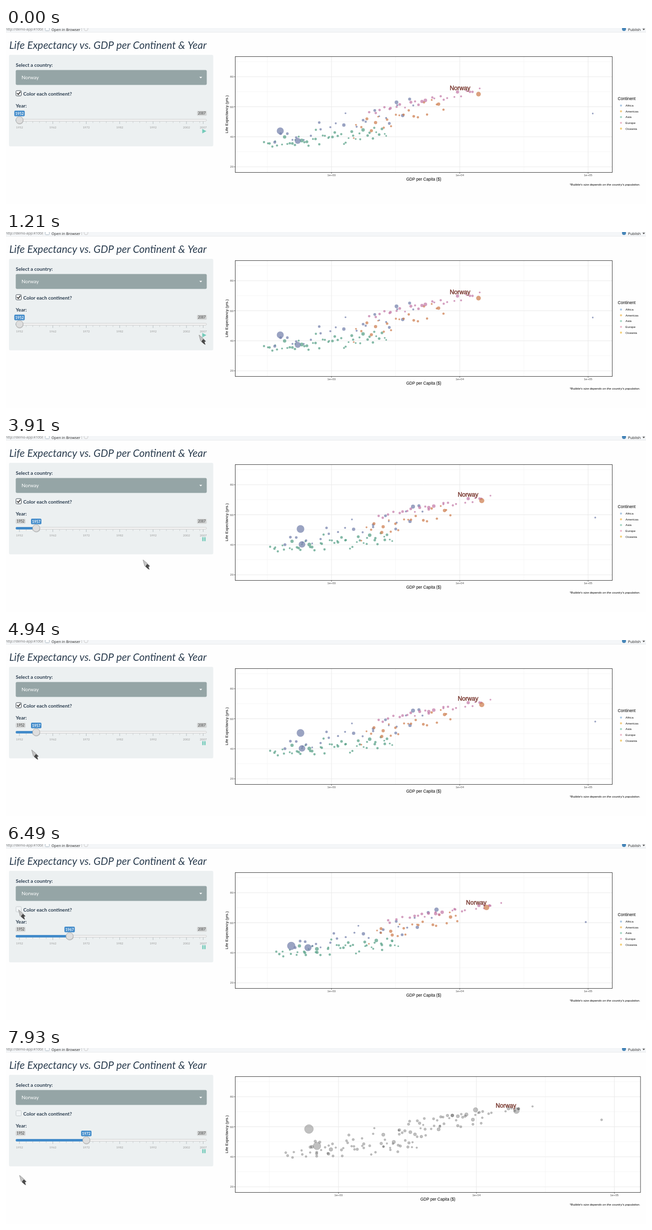
Animation of 1280x354 px, one loop 7.99 s. Source, as an HTML page with a canvas:

```html
<!DOCTYPE html>
<html lang="en">
<head>
<meta charset="utf-8">
<title>Life expectancy dashboard</title>
<style>
html, body { margin: 0; width: 100%; height: 100%; overflow: hidden; background: #fefefe; }
canvas { display: block; }
</style>
</head>
<body>
<canvas width="1280" height="354"></canvas>
<script>
const ctx = document.querySelector('canvas').getContext('2d');
const LOOP = 7990;
const LATO = 'Lato, sans-serif';
const ARIAL = '"Liberation Sans", Arial, sans-serif';
const INK = '#2c3e50', BLUE = '#428bca', BROWN = '#7c3d34';

const SLIDER_STEPS = [3450, 4950, 6490, 7930];
const PLOT_STEPS = [3910, 5320, 6880];
const PLAY_CLICK = 1840, UNCHECK = 6340;
const FADE_START = 6880, MONO = 7110, FADE_END = 7180;

// Pointer moves: start, end, x, y reached
const POINTER_START = [1080, 329];
const MOVES = [
  [70, 620, 264, 245], [620, 820, 342, 211], [900, 1210, 386, 207], [1620, 1680, 397, 206],
  [2080, 2390, 274, 249], [4310, 5010, 27, 218], [5730, 6340, 25, 132],
  [6490, 6650, 24, 179], [6880, 7030, 27, 249], [7110, 7180, 27, 256]
];

const COLORS = {
  africa: 'rgba(86,160,134,.72)', asia: 'rgba(115,128,170,.72)',
  americas: 'rgba(205,125,77,.72)', europe: 'rgba(196,122,167,.72)'
};

// Each continent is a seeded cloud along a line; every step shifts it right and
// shrinks its distance to CEILING by the factor rest.
const CEILING = 112;
const CLOUDS = [
  { continent: 'africa', count: 48, from: [516, 234], to: [765, 207], spread: 19, shift: 13, rest: .94 },
  { continent: 'asia', count: 24, from: [530, 230], to: [825, 158], spread: 27, shift: 17, rest: .92 },
  { continent: 'americas', count: 22, from: [690, 204], to: [880, 150], spread: 23, shift: 17, rest: .89 },
  { continent: 'europe', count: 26, from: [725, 168], to: [950, 126], spread: 8, shift: 19, rest: .85 }
];

// Leading bubbles, with their place in each of the four years
const LEADERS = [
  { continent: 'asia', r: 7, path: [[548.5, 207], [589, 187], [570.5, 205], [596, 163]] },
  { continent: 'asia', r: 6, path: [[583.5, 227], [592, 218], [604, 208.5], [611, 197]] },
  { continent: 'asia', r: 3.7, path: [[781, 149.5], [814, 142], [861, 132], [906, 124.5]] },
  { continent: 'asia', r: 1.7, path: [[1173.5, 172], [1178.5, 164], [1159.5, 157], [1140.5, 144.5]] },
  { continent: 'americas', r: 4.7, path: [[945, 133], [951.5, 130], [961, 127.5], [982, 126]] }
];
const LABEL_PATH = [[908, 125], [924, 122], [940.5, 122], [962.5, 120]];

let seed = 11;
const random = () => (seed = seed * 16807 % 2147483647) / 2147483647;
const mix = (a, b, k) => a + (b - a) * k;
const countPassed = (times, t) => times.filter(time => t >= time).length;

const bubbles = CLOUDS.flatMap(({ count, from, to, spread, ...cloud }) =>
  Array.from({ length: count }, (_, i) => {
    const along = (i + random()) / count;
    return {
      ...cloud,
      x: mix(from[0], to[0], along),
      y: mix(from[1], to[1], along) + spread * (random() + random() - 1),
      r: 1.7 + .9 * random() + 1.2 * random() ** 6,
      pace: .7 + .6 * random()
    };
  }));

function text(string, x, y, font, color, align = 'left') {
  ctx.font = font;
  ctx.fillStyle = color;
  ctx.textAlign = align;
  ctx.fillText(string, x, y);
}
function paint(fill, border, width = 1) {
  ctx.fillStyle = fill;
  ctx.fill();
  if (!border) return;
  ctx.strokeStyle = border;
  ctx.lineWidth = width;
  ctx.stroke();
}
function rect(x, y, w, h, fill, radius = 0, border) {
  ctx.beginPath();
  ctx.roundRect(x, y, w, h, radius);
  paint(fill, border);
}
function circle(x, y, r, fill, border, width) {
  ctx.beginPath();
  ctx.arc(x, y, r, 0, 2 * Math.PI);
  paint(fill, border, width);
}
function polygon(fill, ...points) {
  ctx.beginPath();
  points.forEach(([x, y]) => ctx.lineTo(x, y));
  paint(fill);
}
function line(color, width, ...points) {
  ctx.beginPath();
  points.forEach(([x, y]) => ctx.lineTo(x, y));
  ctx.strokeStyle = color;
  ctx.lineWidth = width;
  ctx.stroke();
}

function drawToolbar() {
  const font = '7.4px "Open Sans", sans-serif';
  rect(0, 0, 1280, 8, '#f4f6f8');
  rect(0, 8, 1280, 1, '#e9ebed');
  text('http://demo-app:4100/', -1, 5, '7px "Open Sans", sans-serif', '#777');
  rect(73, 0, 1, 6, '#ccc');
  rect(78.5, -2.5, 8, 8, '#fff', 1, '#a9b6c2');
  text('Open in Browser', 91, 5.5, font, '#222');
  rect(151, 0, 1, 6, '#ccc');
  circle(160, 1.5, 4, '#f4f6f8', '#c8c8c8');
  circle(1236, 2, 4, '#4786b8');
  text('Publish', 1244, 5.5, font, '#222');
  polygon('#444', [1273, 1.5], [1278, 1.5], [1275.5, 4.5]);
}

function drawSlider(step) {
  const yearX = year => 27 + (year - 1952) * 6.68;
  const x = yearX(1952 + 5 * step);
  rect(19.5, 183.5, 381.5, 4, '#f3f3f3', 2, '#cfcfcf');
  rect(19.5, 183, x - 19.5, 5, BLUE, 2);
  for (let year = 1952; year <= 2007; year++) {
    const major = year % 10 === 2 || year === 2007;
    if (year % 2 && !major) continue;
    rect(yearX(year) - .5, 188, .8, major ? 5 : 3, major ? '#a8b0b3' : '#c3c9cb');
    if (major) text(year, yearX(year), 202, '6px ' + LATO, '#999', 'center');
  }
  const endLabel = (year, left) => {
    rect(left, 166.5, 19.5, 10, '#d3d5d5', 2);
    text(year, left + 9.75, 174, '6.67px ' + LATO, '#333', 'center');
  };
  endLabel(2007, 382);
  if (step) endLabel(1952, 19.5);
  rect(x - 10.4, 166.2, 20.8, 11.3, BLUE, 2);
  text(1952 + 5 * step, x, 174.5, 'bold 7.33px ' + LATO, '#fff', 'center');
  circle(x + .3, 186, 7.7, 'rgba(0,0,0,.18)');
  circle(x, 185.3, 7.2, '#dedede', '#b0b0b0');
}

function drawControls(t) {
  const bold = 'bold 10px ' + LATO;
  text('Life Expectancy vs. GDP per Continent & Year', 6.5, 42, 'italic 20.9px ' + LATO, INK);
  rect(6, 54, 408.5, 184, '#ecf0f1', 2.7);
  text('Select a country:', 19.5, 77.5, bold, INK);
  rect(19.5, 84.5, 382, 30, '#95a5a6', 2.7);
  text('Norway', 31, 103, '10px ' + LATO, '#fff');
  polygon('#fff', [386.7, 98.3], [392.3, 98.3], [389.5, 101.2]);

  const checked = t < UNCHECK;
  rect(20, 126, 10.5, 10.5, checked ? '#fff' : '#f1f4f5', 1.5, checked ? '#3b4650' : '#c6cccf');
  if (checked) line('#222', 1.6, [22, 131], [24.5, 133.7], [29, 128]);
  text('Color each continent?', 34.5, 135.5, bold, INK);
  text('Year:', 19.5, 159.5, bold, INK);
  drawSlider(countPassed(SLIDER_STEPS, t));

  const teal = '#75cbba';
  if (t < PLAY_CLICK) {
    polygon(teal, [392.5, 203], [400.8, 207.5], [392.5, 212]);
  } else {
    rect(392.5, 203.5, 2.7, 8, teal);
    rect(396.5, 203.5, 2.7, 8, teal);
  }
}

function drawLegend() {
  text('Continent', 1223.5, 145, '8.3px ' + ARIAL, '#000');
  const items = { Africa: '#a9c6e2', Americas: '#f2cb83', Asia: '#a9d8c6', Europe: '#ecbccb', Oceania: '#f3d07c' };
  Object.entries(items).forEach(([name, color], i) => {
    const y = 156 + 11.6 * i;
    circle(1230, y, 2.1, color);
    text(name, 1239, y + 2.2, '6.2px ' + ARIAL, '#111');
  });
}

function drawAxes(right, mapX) {
  const font = '6px ' + ARIAL, major = '#e9e9e9', minor = '#f3f3f3';
  rect(458.5, 57.5, right - 458.5, 233, '#fff');
  for (let i = 0; i < 4; i++) {
    const y = 98 + 60.4 * i;
    line(minor, .7, [459, y - 30.2], [right, y - 30.2]);
    line(major, 1, [459, y], [right, y]);
    line('#444', .8, [456, y], [458.5, y]);
    text(80 - 20 * i, 455, y + 2.2, font, '#4d4d4d', 'right');
  }
  for (let i = 0; i < 3; i++) {
    const x = mapX(651 + 256.6 * i), between = mapX(522.5 + 256.6 * i);
    line(minor, .7, [between, 58], [between, 290]);
    line(major, 1, [x, 58], [x, 290]);
    line('#444', .8, [x, 290], [x, 293]);
    text('1e+0' + (3 + i), x, 298.3, font, '#4d4d4d', 'center');
  }
}

function drawTitles(right) {
  text('GDP per Capita ($)', (458.5 + right) / 2, 307, '8.2px ' + ARIAL, '#000', 'center');
  text("*Bubble's size depends on the country's population.", 1268.5, 317, 'italic 6.2px ' + ARIAL, '#000', 'right');
  ctx.save();
  ctx.translate(444, 173.5);
  ctx.rotate(-Math.PI / 2);
  text('Life Expectancy (yrs.)', 0, 0, '7.95px ' + ARIAL, '#000', 'center');
  ctx.restore();
}

function drawPlot(t) {
  const step = countPassed(PLOT_STEPS, t);
  const mono = t >= MONO;
  const right = mono ? 1269 : 1212.5;
  const mapX = x => mono ? 665 + (x - 651) * 1.075 : x;
  const drawBubble = (x, y, r, continent) => mono
    ? circle(mapX(x), y, r, 'rgba(70,70,70,.34)', 'rgba(60,60,60,.4)', .5)
    : circle(x, y, r, COLORS[continent]);

  const fading = t >= FADE_START && t < FADE_END;
  ctx.globalAlpha = fading ? 1 - .32 * Math.min(1, (t - FADE_START) / 150, (FADE_END - t) / 70) : 1;
  drawAxes(right, mapX);

  for (const { continent, x, y, r, pace, shift, rest } of bubbles) {
    const age = step * pace;
    drawBubble(x + shift * age, mix(CEILING, y, rest ** age), r, continent);
  }
  for (const { continent, r, path } of LEADERS) {
    drawBubble(...path[step], r * (1 + .09 * step), continent);
  }

  const [x, y] = LABEL_PATH[step];
  text('Norway', mapX(x), y, '12.1px ' + ARIAL, BROWN, 'center');
  ctx.strokeStyle = BROWN;
  ctx.lineWidth = .5;
  ctx.strokeText('Norway', mapX(x), y);

  ctx.strokeStyle = '#444';
  ctx.lineWidth = 1;
  ctx.strokeRect(458.5, 57.5, right - 458.5, 233);
  drawTitles(right);
  if (!mono) drawLegend();
  ctx.globalAlpha = 1;
}

function drawPointer(t) {
  if (t < MOVES[0][0]) return;
  let [x, y] = POINTER_START;
  for (const [start, end, toX, toY] of MOVES) {
    const k = Math.min(1, Math.max(0, (t - start) / (end - start)));
    x = mix(x, toX, k);
    y = mix(y, toY, k);
  }
  ctx.save();
  ctx.translate(x, y);
  polygon('#4a4a4a', [9, 8], [14, 13], [11, 14], [13, 20], [9.5, 18], [4.5, 13.5], [7, 9.5]);
  polygon('#c4c4c4', [0, 0], [10, 8.5], [7, 9.5], [3.5, 13]);
  line('#8b8b8b', .8, [3.5, 13], [0, 0], [10, 8.5]);
  ctx.restore();
}

function frame(now) {
  const t = now % LOOP;
  rect(0, 0, 1280, 354, '#fefefe');
  drawToolbar();
  drawControls(t);
  drawPlot(t);
  drawPointer(t);
  requestAnimationFrame(frame);
}
requestAnimationFrame(frame);
</script>
</body>
</html>
```
